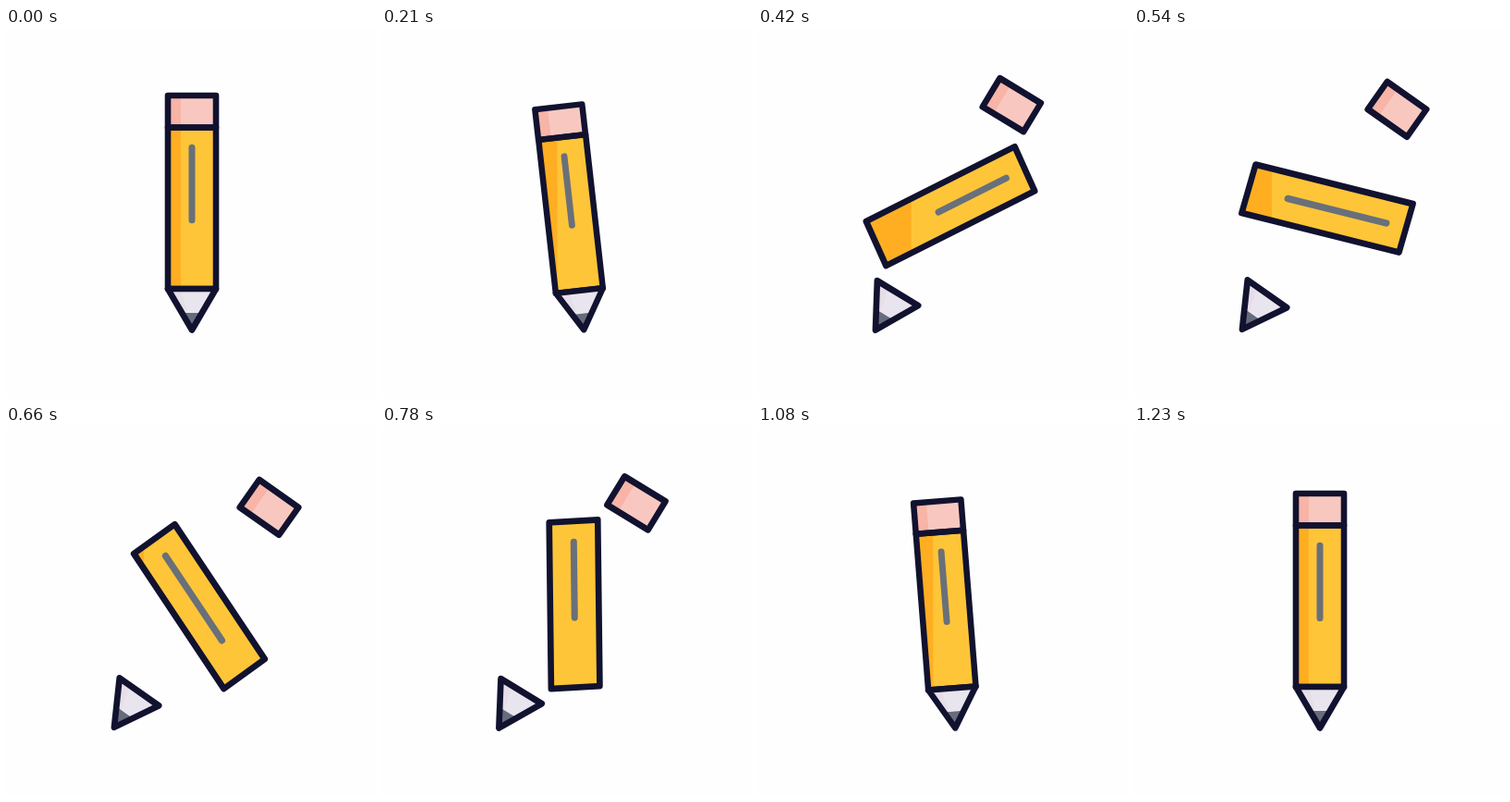
Recreate the animation shown at these times as an HTML page. Size 400 px wide and 400 px high, loop 3260 ms.

```html
<!DOCTYPE html>
<html lang="en">
<head>
<meta charset="utf-8">
<title>Pencil</title>
<style>
  html, body { margin: 0; width: 100%; height: 100%; overflow: hidden; background: #fefefe; }
  svg { display: block; width: 100%; height: 100%; }
  .ink { fill: none; stroke: #11122f; stroke-width: 6.6; stroke-linejoin: round; }
</style>
</head>
<body>
<svg viewBox="0 0 400 400">
  <defs>
    <clipPath id="bodyClip"><rect id="clipRect" x="-26" y="-87.25" width="52" height="174.5"/></clipPath>
  </defs>
  <g clip-path="url(#bodyClip)">
    <rect width="400" height="400" fill="#ffc538"/>
    <rect id="shade" height="400" fill="#ffae22"/>
  </g>
  <g id="pencil">
    <g id="eraser">
      <rect x="-26" y="-17.25" width="52" height="34.5" fill="#f8c8c0"/>
      <rect x="-26" y="-17.25" width="14" height="34.5" fill="#f7b4a7"/>
      <rect class="ink" x="-26" y="-17.25" width="52" height="34.5"/>
    </g>
    <g id="body">
      <line id="mark" stroke="#69707a" stroke-width="7" stroke-linecap="round"/>
      <rect class="ink" x="-26" y="-87.25" width="52" height="174.5"/>
    </g>
    <g id="tip">
      <path d="M-26 0H26L0 44.5Z" fill="#e9e5ee"/>
      <path d="M-26 0H-12L-5 26H-10.8Z" fill="#e6dee8"/>
      <path d="M-10.8 26H10.8L0 44.5Z" fill="#666c7c"/>
      <path class="ink" d="M-26 0H26L0 44.5Z"/>
    </g>
  </g>
</svg>
<script>
const LOOP = 3260, STEP = 30;
const LEAN = 210, PEAK = 600, JOIN = 998, REST = 1220;
const $ = id => document.getElementById(id);
const [pencil, eraser, body, tip, clipRect, shade, mark] =
  ["pencil", "eraser", "body", "tip", "clipRect", "shade", "mark"].map($);

const ramp = (t, a, b) => Math.min(1, Math.max(0, (t - a) / (b - a)));
const smooth = u => u * u * (3 - 2 * u);
const sine = u => (1 - Math.cos(Math.PI * u)) / 2;
const mix = (a, b, u) => a + (b - a) * u;
const bezier = ([a, b, c, d], u) => {
  const v = 1 - u;
  return a * v ** 3 + 3 * b * v * v * u + 3 * c * v * u * u + d * u ** 3;
};

// The centre goes from its resting place to the start of a curved flight.
const HOME = { x: 201, y: 194.75 };
const FLIGHT = { x: [204, 198.4, 206, 209], y: [201, 187.2, 185.3, 195.2] };

function draw(t) {
  const lean = t < PEAK ? sine(ramp(t, 0, LEAN)) : 1 - sine(ramp(t, JOIN, REST));
  const u = t < PEAK ? ramp(t, LEAN, PEAK) : 1 - ramp(t, PEAK, JOIN);
  const out = 1 - (1 - u) ** 3;

  const x = mix(HOME.x, bezier(FLIGHT.x, out), lean);
  const y = mix(HOME.y, bezier(FLIGHT.y, out), lean);
  const angle = -6.5 * lean + 41.8 * out;
  const sx = 1 - 0.015 * lean + 0.013 * out;
  const sy = 1 - 0.043 * lean + 0.097 * out;
  const pose = `translate(${x} ${y}) rotate(${angle}) scale(${sx} ${sy})`;
  pencil.setAttribute("transform", pose);

  // Both ends slide away along the axis while the body makes half a turn.
  const gap = 20 * out;
  const spin = ramp(t, 200, 1000);
  const turn = `rotate(${180 * smooth(spin)})`;
  eraser.setAttribute("transform", `translate(0 ${-104.5 - gap})`);
  tip.setAttribute("transform", `translate(0 ${87.25 + gap})`);
  body.setAttribute("transform", turn);
  clipRect.setAttribute("transform", `${pose} ${turn}`);

  // The shadow edge stays upright throughout.
  shade.setAttribute("width", x - 12 - 2.5 * lean - 48 * Math.sin(Math.PI * spin) ** 2);

  // The mark stretches to the far end, then lets go of the near one.
  mark.setAttribute("y1", mix(-65.5, -13, smooth(ramp(t, 550, 800))));
  mark.setAttribute("y2", mix(13, 65.5, smooth(ramp(t, 400, 650))));
}

const start = performance.now();
function tick() {
  const t = (performance.now() - start) % LOOP;
  draw(Math.floor(t / STEP) * STEP);
  requestAnimationFrame(tick);
}
tick();
</script>
</body>
</html>
```
